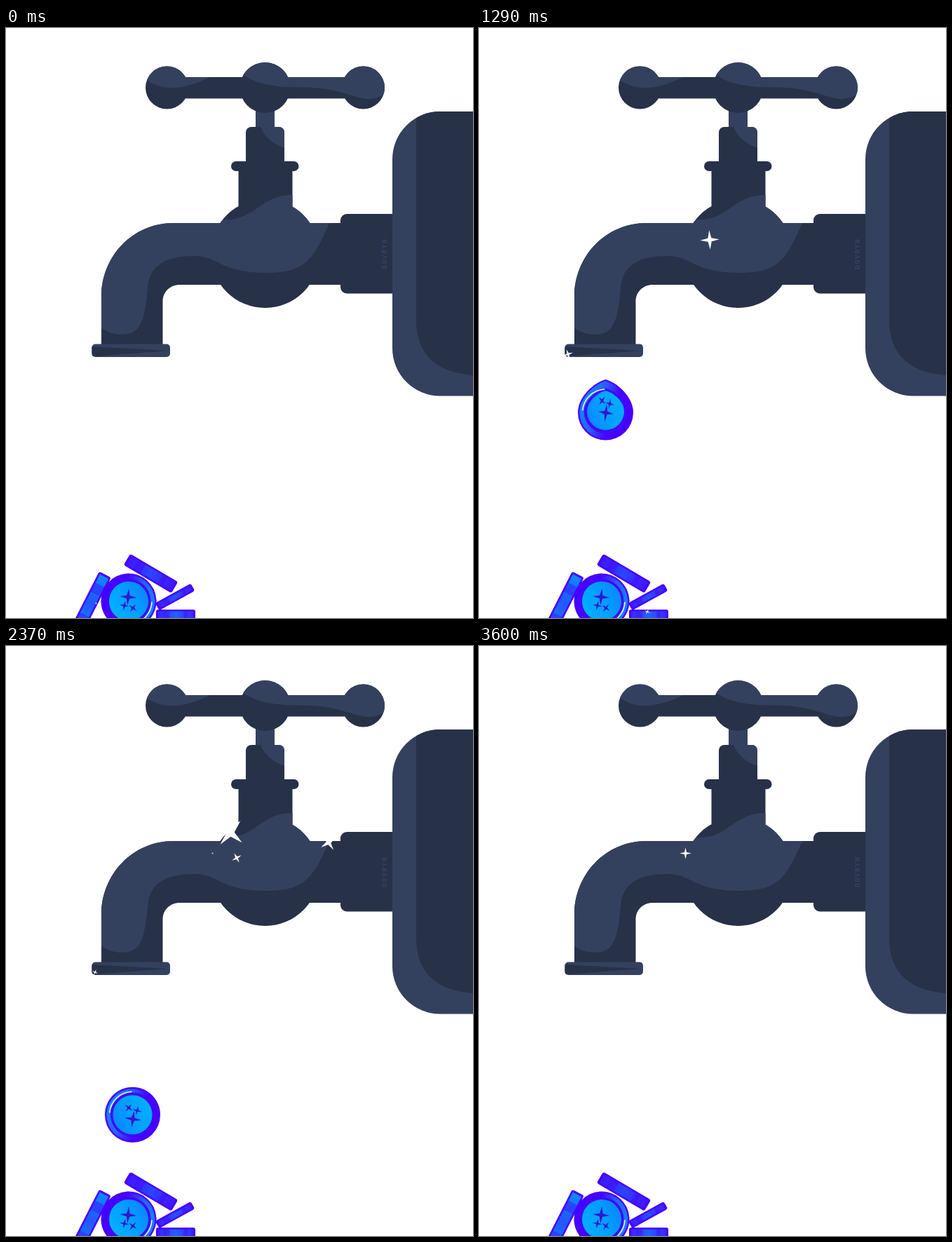
Write an HTML page with a canvas that moves like this. It is 666 by 841 pixels and loops after 3.63 s.

```html
<!DOCTYPE html>
<html lang="en">
<head>
<meta charset="utf-8">
<title>Coin tap</title>
<style>
html, body { margin: 0; width: 100%; height: 100%; overflow: hidden; background: #fff; }
canvas { display: block; }
</style>
</head>
<body>
<canvas id="stage" width="666" height="841"></canvas>
<script>
const ctx = document.getElementById('stage').getContext('2d');
const LOOP = 3630, STEP = 30, TAU = Math.PI * 2;
const DARK = '#273148', LIGHT = '#34415e', PURPLE = '#4600ff', INK = '#3316cf';

const lerp = (a, b, k) => a + (b - a) * k;
const clamp = v => Math.max(0, Math.min(1, v));
const ease = v => v * v * (3 - 2 * v);
const rad = d => d * Math.PI / 180;

function at(x, y, deg, draw) {
  ctx.save();
  ctx.translate(x, y);
  ctx.rotate(rad(deg));
  draw();
  ctx.restore();
}

function fill(path, color) {
  ctx.fillStyle = color;
  ctx.fill(path);
}

// Fills a shape, then paints a patch that stays inside it
function shade(path, base, color, patch) {
  fill(path, base);
  ctx.save();
  ctx.clip(path);
  fill(new Path2D(patch), color);
  ctx.restore();
}

function ramp(x0, y0, x1, y1, ...colors) {
  const g = ctx.createLinearGradient(x0, y0, x1, y1);
  colors.forEach((c, i) => g.addColorStop(i / (colors.length - 1), c));
  return g;
}

function box(x, y, w, h, r = 0) {
  const p = new Path2D();
  p.roundRect(x, y, w, h, r);
  return p;
}

function disc(p, x, y, r) {
  p.moveTo(x + r, y);
  p.arc(x, y, r, 0, TAU);
}

// Four-pointed sparkle
function star(x, y, size, deg, color) {
  at(x, y, deg, () => {
    ctx.fillStyle = color;
    ctx.beginPath();
    for (let i = 0; i < 8; i++) {
      const a = i * TAU / 8, r = i % 2 ? size * .26 : size;
      ctx.lineTo(Math.cos(a) * r, Math.sin(a) * r);
    }
    ctx.fill();
  });
}

// ---- tap ----
const handle = box(230, 70, 280, 30.5);
disc(handle, 229.5, 85, 30.5);
disc(handle, 369.5, 85, 36);
disc(handle, 509.5, 85, 30.5);

const body = new Path2D('M480 278V366H248C234 366 223.5 376 223.5 390V455H136V383C136 326 180 278 239 278Z');
disc(body, 369.5, 321.5, 77.5);
body.rect(331.5, 200, 77, 80);

function tap() {
  fill(box(356, 112, 27, 34), LIGHT);
  shade(box(342, 141, 55, 55, [8, 8, 0, 0]), DARK, LIGHT, 'M363 141C368 155 382 166 397 171V141Z');
  shade(handle, DARK, LIGHT,
    'M198 72C222 91 254 89 293 69V40H198Z' +
    'M333 62C350 80 385 85 425 84.5C470 85 492 98 513 101C525 102 535 98 542 93V40H333Z');
  shade(body, DARK, LIGHT,
    'M461 278V238H408C362 238 356 275 311 273L300 277H130V423C146 437 160 437 170 436.5' +
    'C192 435 198 416 202 371C204 337 230 325 268 325C304 325 304 348 370 349C428 349 438 330 461 278Z');
  fill(box(321, 190, 96.5, 14, 7), DARK);
  fill(box(477, 265, 80, 113.5, [9, 0, 0, 9]), DARK);
  shade(box(551, 119, 200, 405.5, 68), LIGHT, DARK, 'M585 110H700V496L666 495C616 491 585 468 585 416Z');
  shade(box(122.5, 450.5, 111.5, 18.5, 5), LIGHT, DARK, 'M122 454L230 460L126 468H122Z');
  at(542.5, 344, -90, () => {
    ctx.fillStyle = '#35425f';
    ctx.font = 'bold 10px "Liberation Mono", monospace';
    ctx.letterSpacing = '1.4px';
    ctx.fillText('DOVRYN', 0, 0);
  });
}

// ---- coins ----
// Circle of radius r at (0, y) whose top is drawn out to a tip as k goes to 1
function blob(r, y, top, k) {
  const c = r * .552, h = y - top;
  const ax = lerp(c, 2, k), ay = lerp(top, top + h * .43, k), by = lerp(y - c, y - h * .46, k);
  const p = new Path2D();
  p.moveTo(0, top);
  p.bezierCurveTo(ax, ay, r, by, r, y);
  p.arc(0, y, r, 0, Math.PI);
  p.bezierCurveTo(-r, by, -ax, ay, 0, top);
  return p;
}

function coin(r, k) {
  const s = r / 39.5, rise = r + 32.5 * k;
  fill(blob(r, 0, -rise, k), PURPLE);
  fill(blob(r * .94, 0, r * .06 - rise, k), ramp(-36, -12, 34, 12, '#1085ff', '#2860ff', '#4a00ff', '#4600ff'));
  fill(blob(lerp(31.5, 28, k) * s, -4 * k, -lerp(31.5 * s, rise - 2, k), k), '#4208f4');
  fill(blob(lerp(28, 21.5, k) * s, -6 * k, -lerp(28 * s, rise - 6, k), k),
    ramp(-26, 16, 26, -12, '#0a86ff', '#00a0ff', '#00b0ff'));
  if (k < .3) {
    ctx.strokeStyle = '#e8f4ff';
    ctx.lineWidth = 1.6;
    ctx.beginPath();
    ctx.arc(0, 0, 33 * s, rad(185), rad(268));
    ctx.stroke();
  }
  ctx.save();
  ctx.translate(0, -26 * k);
  ctx.scale(s * (1 - .4 * k), s * (1 + .3 * k));
  star(.5, 6, 12, 8, INK);
  star(-5.5, -10, 7, 40, INK);
  star(6.5, -6, 7, 15, INK);
  ctx.restore();
}

// Coin seen from its edge
function bar(x, y, len, th, deg, a, b) {
  at(x, y, deg, () => {
    fill(box(-len / 2, -th / 2, len, th, 3), PURPLE);
    fill(box(-len / 2 + 3, -th / 2 + 2.5, len - 6, th - 5, 1), ramp(-len / 2, 0, len / 2, 0, a, b, a));
    ctx.fillStyle = 'rgba(70,0,255,.4)';
    ctx.fillRect(-len * .32, -th / 2 + 2, len * .16, th - 4);
    ctx.fillRect(len * .2, -th / 2 + 2, len * .1, th - 4);
  });
}

function pile() {
  bar(120.5, 820, 92, 19, 117, '#0c8cff', '#2257ff');
  at(175, 817, 177, () => coin(39.5, 0));
  bar(206.5, 777.5, 79, 18.5, 30.6, '#4310ff', '#2a46ff');
  bar(241, 811, 58, 12, -29, '#4018ff', '#2850ff');
  bar(242, 837.5, 56, 17, 0, '#3b20ff', '#2460ff');
}

// The coin grows inside the spout, falls with steady acceleration,
// and sags into a drop for a moment around 960 ms.
function drop(t) {
  if (t > 2980) return;
  const s = t - 1620;
  const y = Math.min(721, 575 + .1089 * s + 2.06e-5 * s * s);
  const r = 39.5 * ease(clamp(t / 590));
  const k = ease(clamp(1 - Math.abs(t - 960) / 480));
  at(180.5, y + 29 * k, 0, () => {
    coin(r, k);
    // breaks up in horizontal bands on landing
    ctx.fillStyle = '#fff';
    for (let i = 0; i < 7; i++) {
      const row = (12 - 2 * i) % 7, h = Math.min(14, (t - 2630 - i * 35) * .12);
      if (h > 0) ctx.fillRect(-42, 12 * row - 35 - h / 2, 84, h);
    }
  });
}

// ---- sparkles: x, y, size, peak time, angle at the peak ----
const HALF_LIFE = 555, SPIN = -.055;
const sparks = [
  [322, 267, 25, 600, 20], [320, 266, 22, 2385, 40],
  [329, 302, 15, 1140, 5], [329, 302, 17, 2760, 40],
  [294.5, 295.5, 14, 1860, 68], [294.5, 295.5, 14, 3270, 18],
  [127, 465, 12, 960, 0], [127, 465, 12, 2790, 0],
  [460, 280, 13, 2400, 55], [128.5, 820, 12, 500, 5], [240, 832, 8, 1650, 5]
];

function twinkle(t) {
  for (const [x, y, size, peak, deg] of sparks) {
    const d = t - peak;
    if (Math.abs(d) < HALF_LIFE) star(x, y, size * Math.cos(d / HALF_LIFE * Math.PI / 2), deg + SPIN * d, '#fff');
  }
}

const begin = performance.now();

function draw() {
  const t = Math.floor((performance.now() - begin) % LOOP / STEP) * STEP;
  ctx.fillStyle = '#fff';
  ctx.fillRect(0, 0, 666, 841);
  drop(t);
  tap();
  pile();
  twinkle(t);
  requestAnimationFrame(draw);
}
draw();
</script>
</body>
</html>
```
